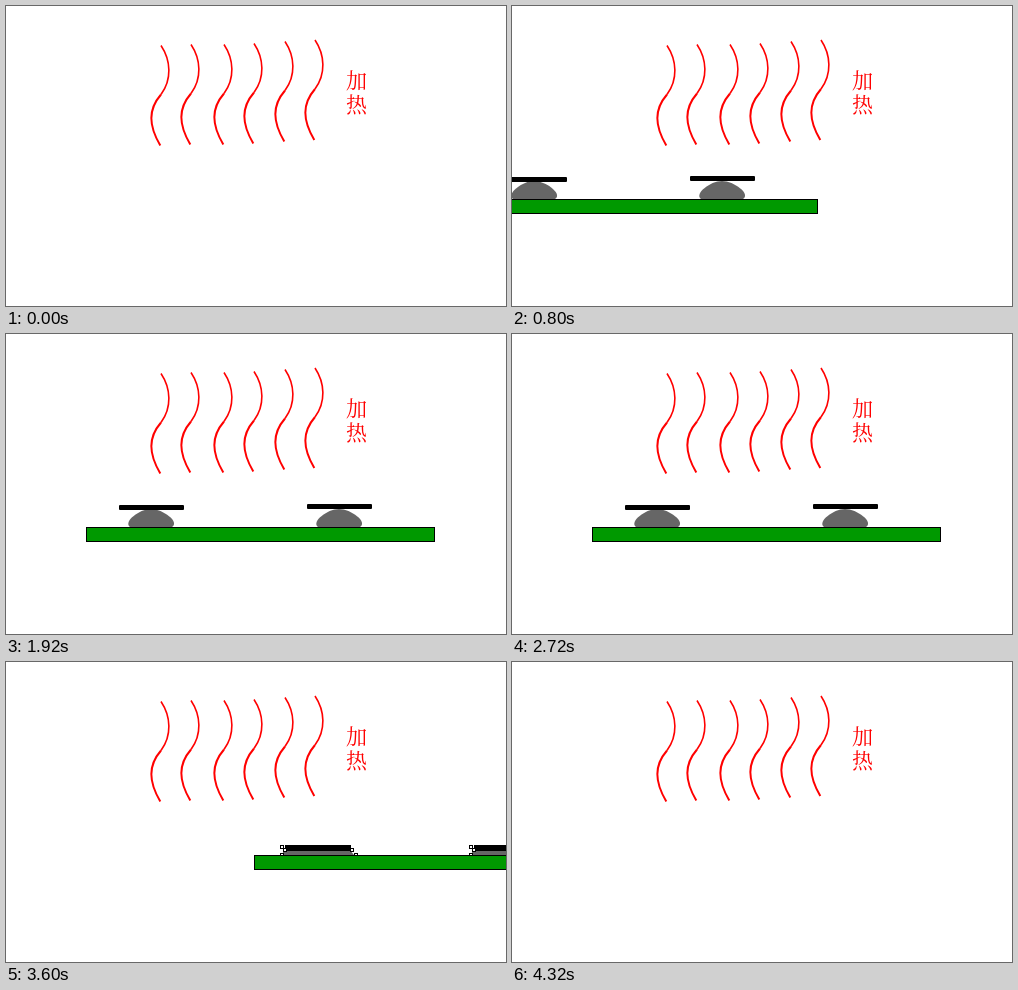
An HTML page with a canvas that plays this animation: 500 px wide and 300 px high, repeating every 4400 ms.

```html
<!DOCTYPE html>
<html lang="zh">
<head>
<meta charset="utf-8">
<style>
  html, body { margin: 0; width: 100%; height: 100%; overflow: hidden; background: #fff; }
  canvas { display: block; }
</style>
</head>
<body>
<canvas id="stage" width="500" height="300"></canvas>
<script>
const ctx = document.getElementById('stage').getContext('2d');
const LOOP = 4400, STEP = 80;
const ARRIVE = 1120, PRESS = 3120, BLINK = 400;
const REST_X = 80, SPEED_IN = 30.8, SPEED_OUT = 28;
const WAVE_TOPS = [[155, 39.5], [185, 38.5], [218, 38.5], [248, 37.5], [279, 35.5], [309, 34]];

function box(x, y, w, h, color) {
  ctx.fillStyle = color;
  ctx.fillRect(x, y, w, h);
}

function drawHeat() {
  ctx.strokeStyle = ctx.fillStyle = '#f00';
  for (const [x, y] of WAVE_TOPS) {
    ctx.lineWidth = 1.6;
    ctx.beginPath();
    ctx.moveTo(x, y);
    ctx.bezierCurveTo(x + 10, y + 15, x + 11, y + 34, x, y + 49);
    ctx.stroke();
    ctx.lineWidth = 2;
    ctx.beginPath();
    ctx.moveTo(x, y + 49);
    ctx.bezierCurveTo(x - 13, y + 64, x - 12.5, y + 80, x - 0.7, y + 100);
    ctx.stroke();
  }
  ctx.font = '21px "Noto Serif CJK SC", "Noto Sans CJK SC", "Noto Sans CJK", serif';
  ctx.textAlign = 'center';
  ctx.fillText('加', 350.5, 81.5);
  ctx.fillText('热', 350.5, 105.5);
}

function drawBoard(x) {
  box(x, 193, 349, 15, '#000');
  box(x + 1, 194, 347, 13, '#090');
}

// Solder dome with a lead resting on top
function drawRaised(x, barY) {
  ctx.fillStyle = '#666';
  ctx.beginPath();
  ctx.moveTo(x + 11, 193);
  ctx.bezierCurveTo(x + 4, 188, x + 20, 175, x + 32, 175);
  ctx.bezierCurveTo(x + 44, 175, x + 61, 188, x + 53, 193);
  ctx.fill();
  ctx.fillStyle = '#000';
  ctx.beginPath();
  ctx.roundRect(x, barY, 65, 5, 1);
  ctx.fill();
}

function drawHandle(x, y) {
  box(x, y, 4, 4, '#000');
  box(x + 1, y + 1, 2, 2, '#fff');
}

// Flattened solder under the lead, with its corner handles
function drawPressed(x) {
  ctx.fillStyle = '#666';
  ctx.beginPath();
  ctx.moveTo(x + 4, 188);
  ctx.lineTo(x + 70, 188);
  ctx.lineTo(x + 74, 193);
  ctx.lineTo(x + 2, 193);
  ctx.fill();
  box(x + 5, 183, 66, 6, '#000');
  for (const [dx, y] of [[0, 183], [3, 186], [70, 186], [0, 191], [74, 191]]) drawHandle(x + dx, y);
}

function draw(t) {
  box(0, 0, 500, 300, '#fff');

  const beat = Math.floor((t - ARRIVE) / BLINK);
  const hidden = t >= ARRIVE && t < PRESS && beat % 2 === 1;
  if (!hidden) drawHeat();

  if (t < PRESS) {
    const left = Math.round(REST_X - Math.max(0, ARRIVE - t) / STEP * SPEED_IN);
    drawRaised(left + 33, 171);
    drawRaised(left + 221, 170);
    drawBoard(left);
  } else {
    const left = REST_X + (t - PRESS) / STEP * SPEED_OUT;
    drawPressed(left + 26);
    drawPressed(left + 215);
    drawBoard(left);
  }
}

function tick() {
  const t = performance.now() % LOOP;
  draw(Math.floor(t / STEP) * STEP);
  requestAnimationFrame(tick);
}
tick();
</script>
</body>
</html>
```
